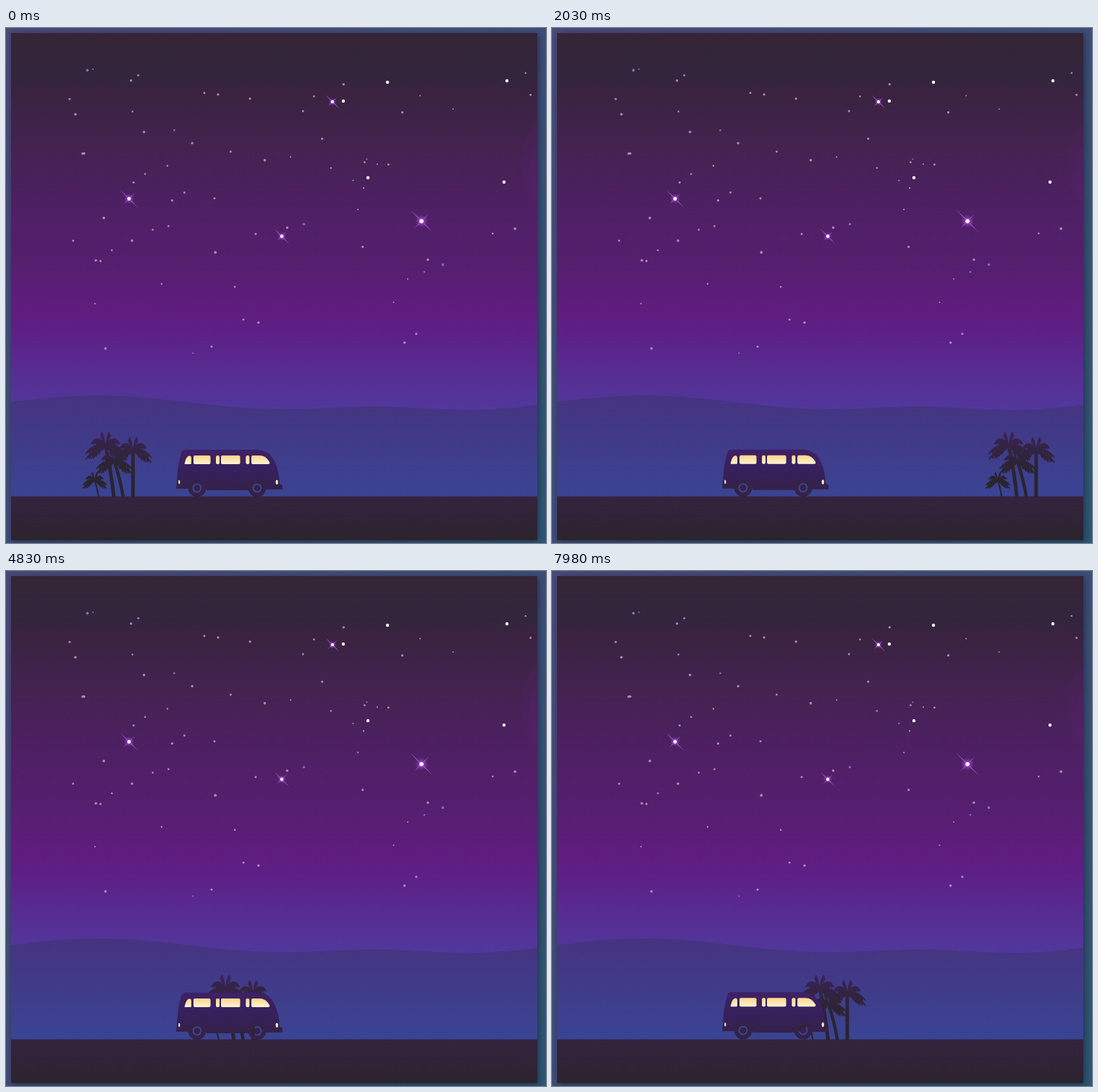
Animation, 746 px wide and 712 px high, one loop 8000 ms. Source, as an HTML page with a canvas:

```html
<!DOCTYPE html>
<html lang="en">
<head>
<meta charset="utf-8">
<title>Night drive</title>
<style>
  html, body { margin: 0; width: 100%; height: 100%; overflow: hidden; background: #3d4d78; }
  canvas { display: block; }
</style>
</head>
<body>
<canvas id="stage" width="746" height="712"></canvas>
<script>
const W = 746, H = 712, LOOP = 8000, STEP = 70;
const PANEL = { x: 7, y: 7, w: 727, h: 701 };
const ROAD_Y = 647.5;
const ctx = document.getElementById('stage').getContext('2d');

// The palms cross the panel at an even speed; the scene itself cuts back once per SCENE.
const PASS = { time: 1940, start: 735, speed: 0.381, offset: 255 };
const SCENE = { length: 5265, cut: 1925 };
const RUMBLE = 200.6;

const BRIGHT = [[527, 75], [692, 73], [466, 101], [500, 207], [688, 213]];
const SPARKLES = [[170, 236, 13], [381, 288, 11], [451, 102, 10], [574, 267, 17]];

function seeded(seed) {
  return () => {
    seed = (seed * 1664525 + 1013904223) % 4294967296;
    return seed / 4294967296;
  };
}

function vertical(y0, y1, ...stops) {
  const g = ctx.createLinearGradient(0, y0, 0, y1);
  stops.forEach(([at, color]) => g.addColorStop(at, color));
  return g;
}

function disc(x, y, r, ry = r) {
  ctx.beginPath();
  ctx.ellipse(x, y, r, ry, 0, 0, 7);
  ctx.fill();
}

function fillPath(d, color) {
  ctx.fillStyle = color;
  ctx.fill(new Path2D(d));
}

const skyFill = vertical(7, 525,
  [0, '#352536'], [.11, '#32253d'], [.15, '#39233f'], [.3, '#432350'], [.46, '#4e2063'],
  [.6, '#541f6d'], [.74, '#5f1d7e'], [.8, '#5d2086'], [.88, '#592a90'], [1, '#51379b']);
const hillFill = vertical(508, ROAD_Y, [0, '#463380'], [1, '#3a4493']);
const roadFill = vertical(ROAD_Y, 708, [0, '#35233f'], [1, '#2b242d']);
const vanFill = vertical(583, 640, [0, '#3e2166'], [.6, '#36205a'], [1, '#342247']);
const windowFill = vertical(591, 603, [0, '#ffd588'], [1, '#fff3d4']);
const palmFill = vertical(560, ROAD_Y, [0, '#3a2254'], [.3, '#32243f'], [.6, '#2a2430'], [1, '#2a242e']);

function drawFrame() {
  const g = ctx.createLinearGradient(0, 0, W, H);
  g.addColorStop(0, '#4a4878');
  g.addColorStop(.5, '#3d4d78');
  g.addColorStop(1, '#2c5875');
  ctx.fillStyle = g;
  ctx.fillRect(0, 0, W, H);
  ctx.save();
  ctx.shadowColor = 'rgba(20,20,40,.55)';
  ctx.shadowBlur = 9;
  ctx.shadowOffsetX = ctx.shadowOffsetY = 2;
  ctx.fillStyle = '#352536';
  ctx.fillRect(PANEL.x, PANEL.y, PANEL.w, PANEL.h);
  ctx.restore();
}

function drawStars() {
  const random = seeded(11);
  for (let i = 0; i < 72; i++) {
    const x = 75 + 655 * random(), y = 57 + 395 * random() ** 1.2;
    ctx.fillStyle = i % 10 ? '#a98ab5' : '#6d78b8';
    disc(x, y, 1 + .9 * random());
  }
  ctx.fillStyle = '#ffffff';
  BRIGHT.forEach(([x, y]) => disc(x, y, 2.2));
}

function drawSparkle([x, y, r]) {
  ctx.save();
  ctx.translate(x, y);
  const glow = ctx.createRadialGradient(0, 0, 0, 0, 0, r * .55);
  glow.addColorStop(0, 'rgba(205,110,240,.9)');
  glow.addColorStop(1, 'rgba(140,50,190,0)');
  ctx.fillStyle = glow;
  disc(0, 0, r * .55);
  ctx.fillStyle = '#9a4cc8';
  ctx.rotate(Math.PI / 4);
  for (const [rx, ry] of [[r * 1.35, 1], [1, r * .85]]) {
    ctx.beginPath();
    ctx.moveTo(-rx, 0);
    ctx.lineTo(0, -ry);
    ctx.lineTo(rx, 0);
    ctx.lineTo(0, ry);
    ctx.fill();
  }
  ctx.fillStyle = '#fff4ff';
  disc(0, 0, 1.2 + r * .095);
  ctx.restore();
}

function drawSky() {
  ctx.fillStyle = skyFill;
  ctx.fillRect(PANEL.x, PANEL.y, PANEL.w, PANEL.h);
  ctx.fillStyle = 'rgba(96,35,120,.12)';
  disc(740, 188, 29, 56);
  disc(731, 202, 9, 36);
  drawStars();
  SPARKLES.forEach(drawSparkle);
}

function drawLand() {
  fillPath('M7 517C55 511 92 508 130 508C225 509 290 527 385 527C430 527 465 523 510 523' +
    'C560 524 590 528 640 528C680 528 708 524 734 521V648H7Z', hillFill);
  ctx.fillStyle = roadFill;
  ctx.fillRect(PANEL.x, ROAD_Y, PANEL.w, 708 - ROAD_Y);
}

// An arched leaf with a smooth top and a ragged lower edge.
function drawFrond(x, y, dx, dy, size) {
  const cx = dx * .6, cy = dy - size * .4, notches = 10;
  ctx.beginPath();
  ctx.moveTo(x, y - size * .08);
  ctx.quadraticCurveTo(x + cx, y + cy - size * .12, x + dx, y + dy);
  for (let i = notches - 1; i >= 0; i--) {
    const t = i / notches;
    const drop = size * (i % 2 ? .32 : .16) * Math.sin(Math.PI * (t * .85 + .12));
    ctx.lineTo(
      x + 2 * t * (1 - t) * cx + t * t * dx + Math.sign(dx) * drop * .2,
      y + 2 * t * (1 - t) * cy + t * t * dy + drop);
  }
  ctx.fill();
}

function drawPalm(x, y, size, foot, thick) {
  ctx.lineWidth = thick;
  ctx.beginPath();
  ctx.moveTo(x, y);
  ctx.quadraticCurveTo((x + foot * 2) / 3, (y + ROAD_Y) / 2, foot, ROAD_Y + 1);
  ctx.stroke();
  const fronds = 10;
  for (let i = 0; i < fronds; i++) {
    const a = Math.PI * (.75 + 1.5 * i / (fronds - 1));
    const dx = Math.cos(a), dy = Math.sin(a) * .5 + dx * dx * .55;
    drawFrond(x, y, dx * size, dy * size, size);
  }
}

// Palms are laid out with their left edge at x = 101.
function drawPalms(left) {
  ctx.save();
  ctx.translate(left - 101, 0);
  ctx.fillStyle = ctx.strokeStyle = palmFill;
  drawPalm(134, 577, 29, 145.5, 5);
  drawPalm(172, 583, 27, 172, 5);
  drawPalm(146, 599, 26, 158.5, 4.5);
  drawPalm(119, 625, 18, 124.5, 2.2);
  ctx.restore();
}

function drawWheel(x) {
  const y = 636;
  ctx.fillStyle = '#342247';
  ctx.beginPath();
  ctx.arc(x, y, 12.3, 0, 7);
  ctx.moveTo(x + 6.6, y);
  ctx.arc(x, y, 6.6, 0, 7, true);
  ctx.fill('evenodd');
  disc(x, y, 4.4);
}

function drawVan(lift) {
  ctx.save();
  ctx.translate(0, -lift);
  const wheels = [264, 347];
  const open = new Path2D();
  open.rect(0, 0, W, H);
  wheels.forEach(x => {
    open.moveTo(x + 12, 636);
    open.arc(x, 636, 12, 0, 7);
  });
  // The gaps in the wheels are open, so the body leaves room for them.
  ctx.save();
  ctx.clip(open, 'evenodd');
  fillPath('M235 637L236 628L237 613Q239 598 242 588Q243 583 248 583H343' +
    'C360 583 367 590 372 601Q377 612 378 630L382 632V638H335V639H277V637Z', vanFill);
  ctx.restore();
  wheels.forEach(drawWheel);

  fillPath('M247 601Q249 592 253 591.5Q256 591 256 594V602Q256 603 254 603H248Q246 603 247 601Z', windowFill);
  for (const [x, w] of [[259, 23.5], [290, 5], [297, 26.5], [331.3, 5]]) {
    ctx.beginPath();
    ctx.roundRect(x, 591, w, 12, 2);
    ctx.fill();
  }
  fillPath('M339 593Q339 591 341 591H350Q359 591 364 600Q365 603 362 603H341Q339 603 339 601Z', windowFill);

  ctx.fillStyle = '#fff0cf';
  disc(374.2, 628, 1.6, 3.2);
  disc(239.3, 627.8, 1.1, 2.8);
  ctx.fillStyle = '#c87848';
  disc(238.6, 625.6, .8);
  ctx.restore();
}

function palmLeft(t) {
  const sceneTime = (t - SCENE.cut + SCENE.length) % SCENE.length;
  return PASS.start - PASS.speed * ((sceneTime + PASS.offset) % PASS.time);
}

const vanLift = t => 1 - Math.cos(2 * Math.PI * t / RUMBLE);

function render(now) {
  const t = Math.floor(now % LOOP / STEP) * STEP;
  drawFrame();
  ctx.save();
  ctx.beginPath();
  ctx.rect(PANEL.x, PANEL.y, PANEL.w, PANEL.h);
  ctx.clip();
  drawSky();
  drawLand();
  drawPalms(palmLeft(t));
  drawVan(vanLift(t));
  ctx.restore();
}

let start;
function tick(now) {
  start ??= now;
  render(now - start);
  requestAnimationFrame(tick);
}
render(0);
requestAnimationFrame(tick);
</script>
</body>
</html>
```
